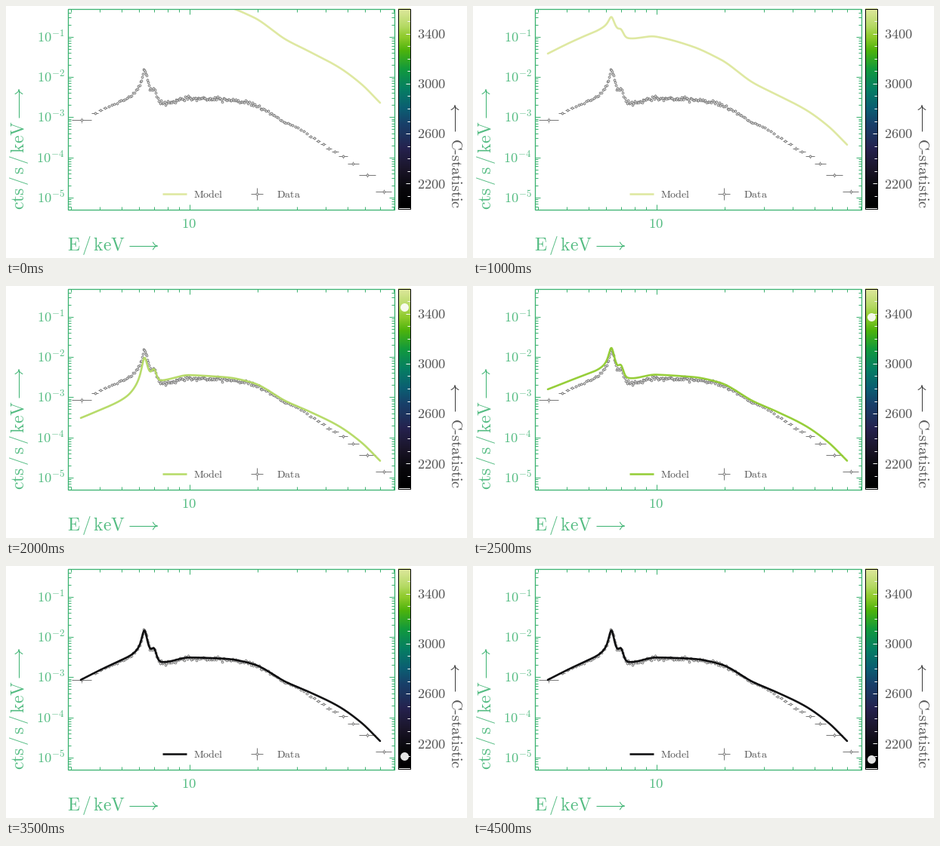
Recreate the animation shown at these times as a matplotlib script. Size 610 by 334 pixels, loop 5000 ms.

```python
import numpy as np
import matplotlib.pyplot as plt
from matplotlib.animation import FuncAnimation
from matplotlib.colors import LinearSegmentedColormap
from matplotlib.patches import Rectangle

W, H, DPI = 610, 334, 64
PX = 72 / DPI                       # points per pixel
GREEN, GRAY, DARK = "#3cb371", "#787878", "#3c3c3c"
LEFT, RIGHT, TOP, BOTTOM = 81.5, 513.5, 3.5, 269.5
BAR_X, BAR_W, BAR_TOP, BAR_BOTTOM = 518.5, 16, 3.5, 268.5
DECADE_X, DECADE_Y = 299.0, 53.3
STAT_MIN, STAT_MAX = 2000, 3600
START, END, PEAK = 99.0, 495.0, 183.2

plt.rcParams["mathtext.fontset"] = "cm"
fig = plt.figure(figsize=(W / DPI, H / DPI), dpi=DPI, facecolor="white")
ax = fig.add_axes([0, 0, 1, 1])
ax.set_xlim(0, W)
ax.set_ylim(H, 0)
ax.axis("off")

cmap = LinearSegmentedColormap.from_list("stat", [
    (0.00, "#000000"), (0.10, "#09080c"), (0.20, "#1b162b"),
    (0.30, "#25224f"), (0.42, "#184069"), (0.50, "#0b5e72"),
    (0.60, "#067f62"), (0.70, "#129a3c"), (0.79, "#4db30c"),
    (0.86, "#8fcb2c"), (0.91, "#b3d962"), (1.00, "#dde79c")])


def smooth(points, x):
    """Monotone cubic curve through a few points."""
    px, py = np.array(points, float).T
    h = np.diff(px)
    d = np.diff(py) / h
    m = np.zeros(len(px))
    m[0], m[-1] = d[0], d[-1]
    for i in range(1, len(px) - 1):
        if d[i - 1] * d[i] > 0:
            m[i] = 2 * d[i - 1] * d[i] / (d[i - 1] + d[i])
    k = np.clip(np.searchsorted(px, x, side="right") - 1, 0, len(h) - 1)
    t = (x - px[k]) / h[k]
    return ((2 * t**3 - 3 * t**2 + 1) * py[k]
            + (t**3 - 2 * t**2 + t) * h[k] * m[k]
            + (3 * t**2 - 2 * t**3) * py[k + 1]
            + (t**3 - t**2) * h[k] * m[k + 1])


def segment(x0, y0, x1, y1, color, width=1.0, z=3):
    ax.plot([x0, x1], [y0, y1], color=color, lw=width * PX, zorder=z,
            solid_capstyle="butt")


def label(x, y, body, size, color, **kw):
    ax.text(x, y, r"$\mathrm{%s}$" % body, fontsize=size * PX, color=color,
            va="baseline", zorder=6, alpha=0.88, **kw)


def turned(x, y, body, size, color, angle):
    label(x, y, body, size, color, ha="left", rotation=angle,
          rotation_mode="anchor")


def arrow(x0, y0, x1, y1, color):
    """Thin arrow with two curved barbs."""
    segment(x0, y0, x1, y1, color)
    length = np.hypot(x1 - x0, y1 - y0)
    ux, uy = (x1 - x0) / length, (y1 - y0) / length
    t = np.linspace(0, 1, 12)
    back, side = -5.5 * t**0.75, 4.8 * t**1.5
    for s in (-1, 1):
        ax.plot(x1 + back * ux - s * side * uy, y1 + back * uy + s * side * ux,
                color=color, lw=PX, zorder=3)


def energy_x(e):
    return 242.6 + DECADE_X * np.log10(e / 10)


def rate_y(r):
    return 40.7 - DECADE_Y * (np.log10(r) + 1)


def stat_y(s):
    return BAR_BOTTOM - (s - STAT_MIN) / (STAT_MAX - STAT_MIN) * (BAR_BOTTOM - BAR_TOP)


def draw_axes():
    ax.add_patch(Rectangle((LEFT, TOP), RIGHT - LEFT, BOTTOM - TOP, fill=False,
                           ec=GREEN, lw=1.3 * PX, zorder=5))
    for e in [*range(3, 11), *range(20, 81, 10)]:
        x, n = energy_x(e), 7 if e == 10 else 4
        segment(x, BOTTOM, x, BOTTOM - n, GREEN)
        segment(x, TOP, x, TOP + n, GREEN)
    for power in range(-6, 0):
        for k in range(1, 10):
            y, n = rate_y(k * 10.0**power), 7 if k == 1 else 4
            if TOP < y < BOTTOM:
                segment(LEFT, y, LEFT + n, y, GREEN)
                segment(RIGHT, y, RIGHT - n, y, GREEN)
        if power > -6:
            label(77.5, rate_y(10.0**power) + 6.5, "10^{%d}" % power, 18.3,
                  GREEN, ha="right")
    label(241.8, 293.5, "10", 18.6, GREEN, ha="center")
    label(81, 324.5, r"E\,/\,keV", 23.7, GREEN, ha="left")
    arrow(162.5, 318, 200, 318, GREEN)
    turned(24, 270.5, r"cts\,/\,s\,/\,keV", 23.7, GREEN, 90)
    arrow(17, 148, 17, 111, GREEN)


def draw_bar():
    ramp = np.linspace(1, 0, 256)[:, None]
    ax.imshow(ramp, cmap=cmap, aspect="auto", vmin=0, vmax=1, zorder=1,
              extent=(BAR_X, BAR_X + BAR_W, BAR_BOTTOM, BAR_TOP))
    end = BAR_X + BAR_W
    for s in range(2100, 3600, 100):
        major = s % 400 == 200
        segment(end - (6 if major else 3.5), stat_y(s), end, stat_y(s), "white")
        if major:
            label(543.5, stat_y(s) + 6.3, str(s), 18.3, DARK, ha="left")
    ax.add_patch(Rectangle((BAR_X, BAR_TOP), BAR_W, BAR_BOTTOM - BAR_TOP,
                           fill=False, ec="black", lw=PX, zorder=4))
    turned(589, 175, r"C\text{-}statistic", 20.4, DARK, 270)
    arrow(594, 166, 594, 132, DARK)


CONTINUUM = [(99, 151), (130, 135.5), (160, 122.5), (180, 116), (206, 128.5),
             (243, 121.5), (290, 123), (327, 130), (371, 154), (400, 166.5),
             (440, 186), (470, 207.5), (495, 232)]


def model_y(x, gain=0, soft=0, step=0, knee=180, width=10, line=1):
    """Height of the model in pixels; the defaults give the best fit."""
    lines = (31 / (1 + ((x - PEAK) / 5)**2)
             + 11 * np.exp(-((x - PEAK - 12.8) / 4)**2))
    return (smooth(CONTINUUM, x) - line * lines - gain
            - soft * np.exp((START - x) / 110)
            - step / (1 + np.exp((x - knee) / width)))


# C-statistic and model parameters for each half second
STEPS = [
    (9000, dict(gain=102, soft=60, step=20, knee=295, width=35, line=0.5)),
    (7000, dict(gain=75, step=40, knee=295, width=35, line=0.5)),
    (5500, dict(gain=48, step=40, knee=295, width=35, line=0.5)),
    (4200, dict(gain=30, soft=16)),
    (3453, dict(soft=12, step=-36)),
    (3376, dict(soft=14, line=0.9)),
    (2450, dict(soft=4)),
    (2098, {}),
    (2086, {}),
    (2075, {}),
]


def data_points():
    """Centres, heights and half widths; bins widen towards both ends."""
    rng = np.random.default_rng(7)
    edges = [86.5]
    while edges[-1] < 500:
        x = edges[-1]
        wide = 1.3 + 8 * np.exp((112 - x) / 22) + np.exp((x - 354) / 37)
        edges.append(x + wide * (1 - 0.45 * np.exp(-((x - PEAK) / 8)**2)))
    edges = np.minimum(edges, 510)
    x, width = (edges[1:] + edges[:-1]) / 2, np.diff(edges)
    spread = np.minimum(1.7, 2.2 / width)
    noise = np.clip(rng.normal(0, 1, len(x)), -2, 2) * spread
    drop = 0.8 + 9 * np.clip((x - 385) / 45, 0, 1)
    return x, model_y(x) + drop + noise, width / 2


def dots(x, y, size):
    ax.plot(x, y, "o", ms=size * PX, mfc="white", mec=GRAY, mew=0.9 * PX,
            zorder=2.5)


def draw_data():
    x, y, half = data_points()
    err = 1.5 + half / 7
    ax.hlines(y, x - half, x + half, color=GRAY, lw=PX, zorder=2)
    ax.vlines(x, y - err, y + err, color=GRAY, lw=0.7 * PX, zorder=2)
    dots(x, y, 2.7)


def draw_legend():
    label(248.5, 253.5, "Model", 14, DARK, ha="left")
    label(358, 253.5, "Data", 14, DARK, ha="left")
    segment(323.5, 248.5, 339.5, 248.5, GRAY, z=2)
    segment(331.5, 240.5, 331.5, 256.5, GRAY, z=2)
    dots([331.5], [248.5], 3)


draw_axes()
draw_bar()
draw_data()
draw_legend()

grid = np.linspace(START, END, 800)
model, = ax.plot([], [], lw=2.6 * PX, zorder=4, solid_capstyle="round")
model.set_clip_path(Rectangle((LEFT, TOP), RIGHT - LEFT, BOTTOM - TOP,
                              transform=ax.transData))
key, = ax.plot([207, 239], [248.5, 248.5], lw=2.6 * PX, zorder=4,
               solid_capstyle="butt")
knob, = ax.plot([], [], "o", ms=11 * PX, mfc="white", mec="none", alpha=0.9,
                zorder=7)


def update(i):
    stat, params = STEPS[i]
    level = min((stat - STAT_MIN) / (STAT_MAX - STAT_MIN), 1.0)
    color = cmap(level, alpha=0.95)
    model.set_data(grid, model_y(grid, **params))
    model.set_color(color)
    key.set_color(color)
    shown = stat <= STAT_MAX
    knob.set_data([527] if shown else [], [stat_y(stat)] if shown else [])
    return model, key, knob


anim = FuncAnimation(fig, update, frames=len(STEPS), interval=500,
                     repeat=True, repeat_delay=0, blit=False)
plt.show()
```
